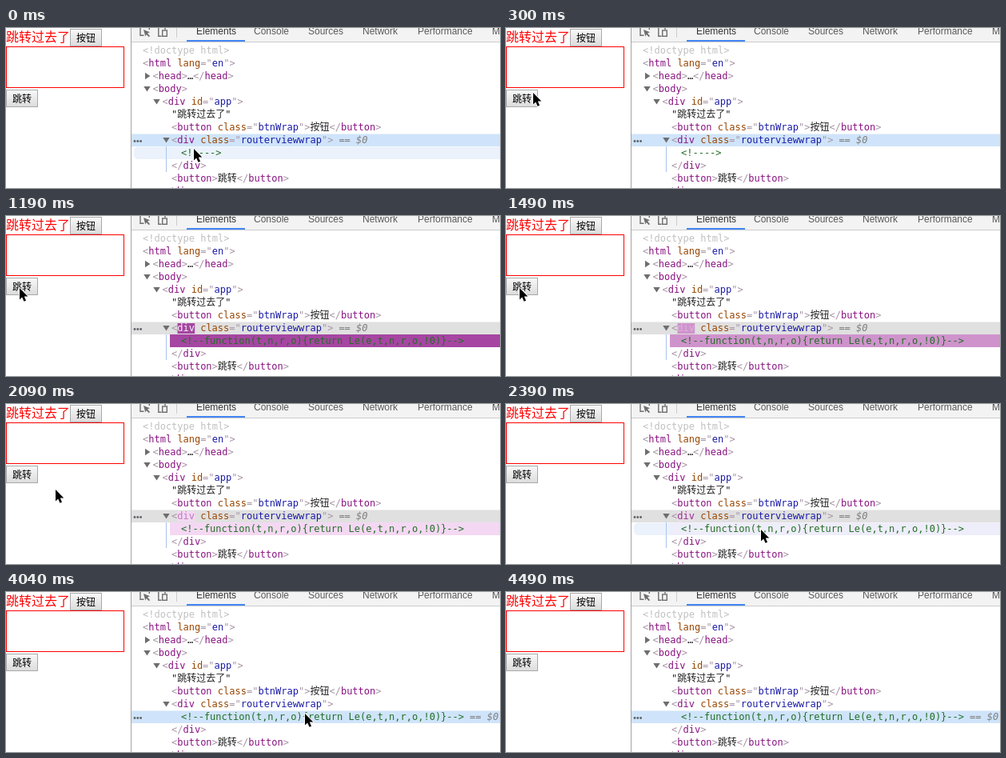
These frames come from a looping animation (618 px wide and 200 px high, 5210 ms). An HTML page:

```html
<!DOCTYPE html>
<html lang="zh-CN">
<head>
<meta charset="utf-8">
<title>Inspector</title>
<style>
  html, body { margin: 0; width: 100%; height: 100%; overflow: hidden; background: #fff; }
  svg { display: block; width: 618px; height: 200px; }
  text { white-space: pre; }
  .code { font: 12px "DejaVu Sans Mono", "Noto Sans CJK SC", "Noto Sans CJK", monospace; fill: #222; }
  .ui { font: 12px "Liberation Sans", sans-serif; fill: #5a5a5a; }
  .page { font: 12px "Noto Sans CJK SC", "Noto Sans CJK", sans-serif; fill: #000; }
  .big { font-size: 16px; fill: #f00; }
  .br { fill: #a894a6; }
  .name { fill: #881280; }
  .attr { fill: #994500; }
  .val { fill: #1a1aa6; }
  .note { fill: #236e25; }
  .doc { fill: #c0c0c0; }
  .ref { fill: #7f7f7f; }
  .it { font-style: italic; }
</style>
</head>
<body>
<svg viewBox="0 0 618 200">
  <defs>
    <linearGradient id="face" x2="0" y2="1">
      <stop stop-color="#f8f8f8"/><stop offset="1" stop-color="#dcdcdc"/>
    </linearGradient>
    <linearGradient id="pressed" x2="0" y2="1">
      <stop stop-color="#d2d2d2"/><stop offset="1" stop-color="#e9e9e9"/>
    </linearGradient>
  </defs>
  <rect width="618" height="200" fill="#fff"/>

  <g id="page">
    <text class="page big" x="0" y="17">跳转过去了</text>
    <rect x="80.5" y="1.5" width="39" height="21" fill="url(#face)" stroke="#a9a9a9"/>
    <text class="page" x="88" y="16.5">按钮</text>
    <rect x=".5" y="23.5" width="147" height="51" fill="none" stroke="#f00"/>
    <rect id="overlay" y="23" width="148" height="52" fill="#6fa8dc" fill-opacity=".66"/>
    <rect id="jump" x=".5" y="77.5" width="39" height="21" stroke="#a9a9a9"/>
    <text class="page" x="8" y="92.5">跳转</text>
  </g>

  <g id="toolbar">
    <rect x="157" width="461" height="17" fill="#f3f3f3"/>
    <path d="M157 17.5H618" stroke="#ccc"/>
    <rect x="226" y="15" width="73" height="2" fill="#4285f4"/>
    <path d="M213.5 0V12" stroke="#ccc"/>
    <g fill="none" stroke="#6e6e6e" stroke-width="1.4">
      <path d="M168 0V9.3H172.5M179.3 0V2"/>
      <path d="M190.8 0V10.3H194.5M199 0V2"/>
      <rect x="195.7" y="3" width="5.6" height="7.3"/>
    </g>
    <path d="M172 2L180 5.2 177 6.6 180 10 178.8 11.2 175.6 7.9 174.4 10.6Z" fill="#6e6e6e"/>
  </g>
  <path d="M156.5 0V200" stroke="#a3a3a3"/>

  <rect id="sel" x="157" width="461" height="15.5"/>
  <rect id="hover" x="160" y="148.5" width="470" height="15.5" rx="5" fill="#ebf2fc"/>
  <rect id="flashRow" x="205" y="148" width="413" height="16"/>
  <rect id="flashTag" x="214.5" y="134" width="21.7" height="13"/>
  <path id="guide" d="M200.5 148V180" stroke="#a9c4ec"/>
  <g id="tree"></g>
  <g id="dots" fill="#5f6368">
    <circle cx="161" r="1.4"/><circle cx="164.8" r="1.4"/><circle cx="168.6" r="1.4"/>
  </g>
  <text id="ref" class="code ref">== <tspan class="it">$0</tspan></text>
  <path id="cursor" d="M0 0V14.4L3.2 11.5 5.5 16.8 8 15.7 5.8 10.6H10.3Z"
        fill="#000" stroke="#fff" stroke-width="1.8" paint-order="stroke" stroke-linejoin="round"/>
</svg>
<script>
const LOOP = 5210;
const $ = id => document.getElementById(id);
const span = (cls, s) => `<tspan class="${cls}">${s.replace(/</g, "&lt;")}</tspan>`;
const close = name => span("br", "</") + span("name", name) + span("br", ">");
const open = (name, attr, val) => span("br", "<") + span("name", name) +
  (attr ? " " + span("attr", attr) + span("br", '="') + span("val", val) + span("br", '"') : "") +
  span("br", ">");

// x and content of each row, 16px apart
const rows = [
  [171, span("doc", "<!doctype html>")],
  [171, open("html", "lang", "en")],
  [183.5, open("head") + "…" + close("head")],
  [183.5, open("body")],
  [195.5, open("div", "id", "app")],
  [207, '"跳转过去了"'],
  [207, open("button", "class", "btnWrap") + "按钮" + close("button")],
  [207, open("div", "class", "routerviewwrap")],
  [219, span("note", "")],
  [207, close("div")],
  [207, open("button") + "跳转" + close("button")],
  [195.5, close("div")]
];
const arrow = (x, y, turn) =>
  `<path d="M-4.2 -3H4.2L0 3.4Z" fill="#6e6e6e" transform="translate(${x} ${y}) rotate(${turn})"/>`;
$("tree").innerHTML =
  rows.map(([x, s], i) => `<text class="code" x="${x}" y="${32 + 16 * i}">${s}</text>`).join("") +
  arrow(177, 60, -90) + arrow(176.5, 76, 0) + arrow(188.5, 92, 0) + arrow(200.5, 140, 0);

const lines = $("tree").querySelectorAll("text");
const tagName = lines[7].querySelector(".name");
const note = lines[8].firstChild;

const tabs = [["Elements", 238], ["Console", 310], ["Sources", 378], ["Network", 446],
  ["Performance", 515], ["Memory", 608]];
$("toolbar").insertAdjacentHTML("beforeend", tabs.map(([s, x], i) =>
  `<text class="ui" x="${x}" y="8"${i ? "" : ' style="fill:#333"'}>${s}</text>`).join(""));

const steps = [
  [0, 234, 150], [150, 98, 111], [300, 33, 80], [450, 9, 77], [590, 8, 77], [740, 15, 87],
  [890, 16, 89], [1040], [1190], [1340], [1490], [1640], [1790], [2090, 61, 106],
  [2240, 282, 145], [2390, 318, 156], [2540, 317, 157], [2840, 300, 154], [2990, 370, 157],
  [3140, 340, 157], [3290, 370, 153], [3440, 373, 151], [4040], [4340, 440, 171], [4490, -50, 0]
];

const mix = (a, b, p) => `rgb(${a.map((v, i) => Math.round(v + (b[i] - v) * p))})`;
const ease = p => 1 - Math.pow(1 - p, 2.2);
const show = (el, on) => el.style.display = on ? "" : "none";

// Node update highlight: purple to pale pink, then out
function flash(t) {
  const p = (t - 1140) / 1400;
  const on = t >= 1190 && p < 1;
  const body = ease(Math.min(1, Math.max(0, p / .8)));
  const tail = ease(Math.min(1, Math.max(0, (p - .8) / .2)));
  for (const el of [$("flashRow"), $("flashTag")]) {
    show(el, on);
    el.setAttribute("fill", mix([158, 54, 153], [245, 219, 244], body));
    el.setAttribute("opacity", 1 - tail);
  }
  const pale = [190, 120, 190];
  tagName.style.fill = !on ? "" :
    tail > 0 ? mix(pale, [136, 18, 128], tail) : mix([255, 255, 255], pale, body);
}

function draw(ms) {
  let t = 0, x, y;
  for (const s of steps) {
    if (s[0] > ms) break;
    t = s[0];
    if (s.length > 1) [, x, y] = s;
  }
  $("cursor").setAttribute("transform", `translate(${x + 1} ${y + 1})`);

  const picked = t >= 4040;
  const rowY = picked ? 156 : 140;
  $("sel").setAttribute("y", rowY - 7.5);
  $("sel").setAttribute("fill", t >= 1040 && !picked ? "#e0e0e0" : "#cfe4fa");
  $("dots").setAttribute("transform", `translate(0 ${rowY + 1.5})`);
  $("ref").setAttribute("x", picked ? 580 : 416.4);
  $("ref").setAttribute("y", rowY + 4);

  show($("guide"), !picked);
  show($("hover"), t < 150 || (t >= 2390 && !picked));
  show($("overlay"), t === 2240);
  $("jump").setAttribute("fill", `url(#${t === 1040 ? "pressed" : "face"})`);
  note.textContent = t < 1190 ? "<!---->" : "<!--function(t,n,r,o){return Le(e,t,n,r,o,!0)}-->";
  flash(t);
}

function tick() {
  draw(performance.now() % LOOP);
  requestAnimationFrame(tick);
}
tick();
</script>
</body>
</html>
```
